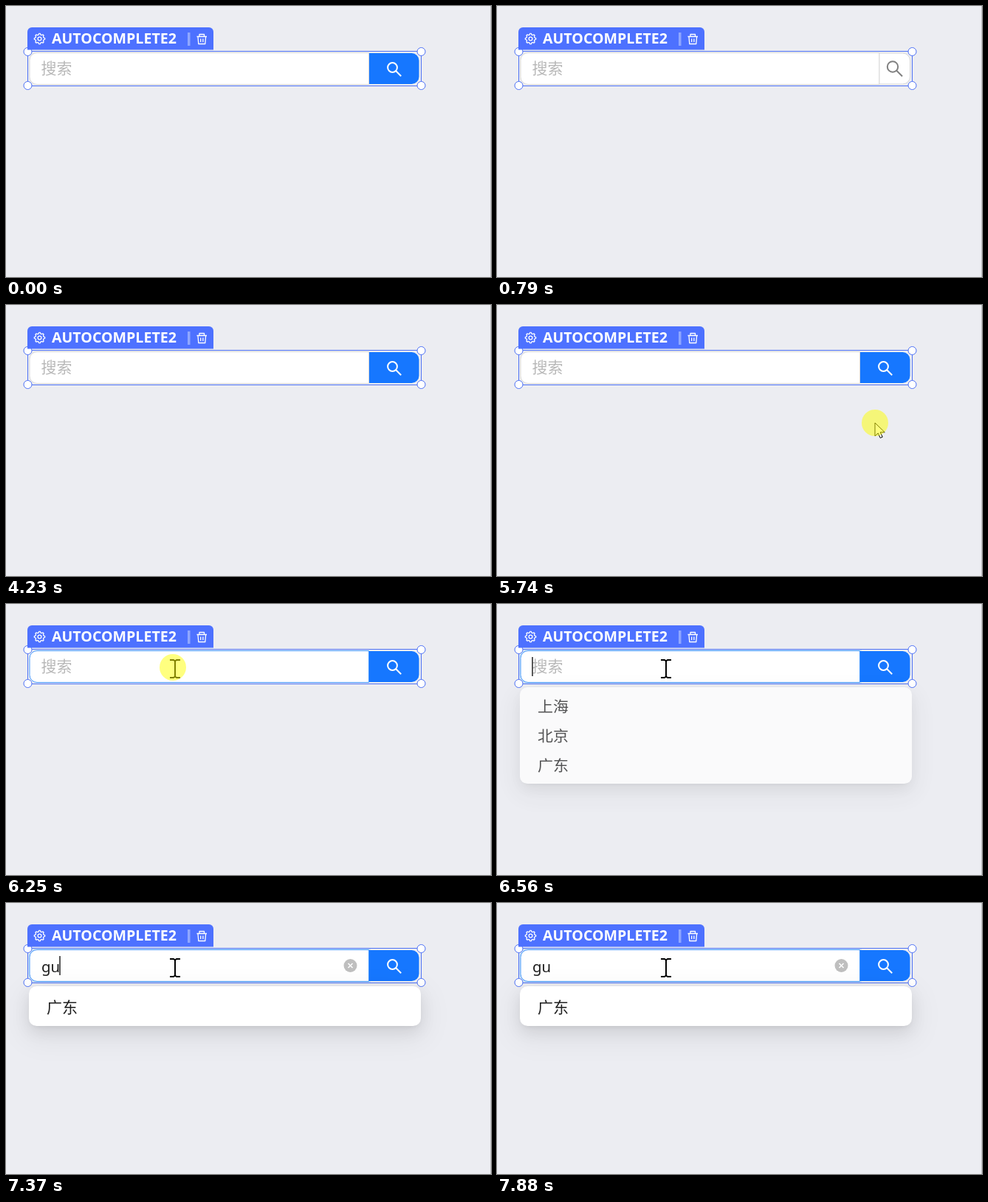
An HTML page that plays this animation: 657x368 px, repeating every 8 s.

```html
<!DOCTYPE html>
<html lang="zh">
<head>
<meta charset="utf-8">
<style>
  html, body { margin: 0; width: 100%; height: 100%; overflow: hidden; background: #ecedf2; }
  svg, #menu { position: absolute; left: 0; top: 0; }
  svg { width: 657px; height: 368px; }
  text, #menu { font: 21px "Noto Sans CJK SC", "Noto Sans CJK", sans-serif; }
  #title { font: 700 19.6px "Open Sans", sans-serif; fill: #fff; }
  #typed { font: 20.4px "Noto Sans", sans-serif; fill: #1f1f1f; }
  #hint { font-weight: 300; fill: #000; fill-opacity: .28; }
  #menu {
    left: 31px; top: 113px; width: 531px; box-sizing: border-box; padding: 6px 24px;
    border-radius: 10.5px; background: #fff; color: #1f1f1f; line-height: 42px;
    transform-origin: 0 0;
    box-shadow: 0 8px 21px rgba(0,0,0,.08), 0 4px 8px -5px rgba(0,0,0,.12), 0 12px 37px 10px rgba(0,0,0,.05);
  }
  #menu div { height: 42px; }
</style>
</head>
<body>
<svg viewBox="0 0 657 368" fill="none">
  <path d="M656.5 0V368" stroke="#c3c4c8"/>
  <path id="glow" stroke="#0591ff" stroke-opacity=".12" stroke-width="5"/>
  <g id="search">
    <path id="field" fill="#fff"/>
    <path id="button"/>
    <path id="lens" stroke-width="2"/>
  </g>
  <rect id="plain" x="31.5" y="63.5" width="530" height="41" rx="9.5"/>
  <text id="hint">搜索</text>
  <text id="typed" x="48" y="94">gu</text>
  <g id="clear">
    <circle cx="466.5" cy="85" r="9" fill="#bfbfbf"/>
    <path d="M463.5 82l6 6m0-6l-6 6" stroke="#fff" stroke-width="1.5"/>
  </g>
  <path id="caret" stroke="#000" stroke-width="1.3"/>
  <g stroke="#4d71f5">
    <rect x="29.5" y="61.5" width="533" height="47"/>
    <g id="handles" fill="#fff"></g>
  </g>
  <path d="M29 59.5V35a6 6 0 0 1 6-6H275a6 6 0 0 1 6 6V59.5z" fill="#4d71ff"/>
  <text id="title" x="62" y="51">AUTOCOMPLETE2</text>
  <rect x="246" y="36" width="3.5" height="18" fill="#8fa7ff"/>
  <g stroke="#fff" stroke-width="1.3" stroke-linejoin="round">
    <path id="gear"/>
    <circle cx="45.5" cy="44.5" r="2.4"/>
    <path d="M258.5 41.5h13.5M262 41v-2.5h6.5V41M260 42l.8 9.5h9L270.600 42M263.700 44.500v4.500M266.900 44.500v4.500"/>
  </g>
</svg>
<div id="menu"></div>
<svg viewBox="0 0 657 368" fill="none">
  <g id="pointer">
    <path id="arrow" d="M0 0V18l4.200-4 3 6.500 3-1.300-3-6.400h6z" fill="#fff" stroke="#000"/>
    <path id="beam" d="M-4-10h5l2 1.500 2-1.500h5M3-9V13M-4 14h5l2-1.500 2 1.500h5" stroke="#000" stroke-width="2"/>
    <circle id="halo" r="18" fill="#ff0" fill-opacity=".5"/>
  </g>
</svg>
<script>
const LOOP = 8000;
const el = Object.fromEntries([...document.querySelectorAll('[id]')].map(e => [e.id, e]));
const set = (e, attrs) => { for (const k in attrs) e.setAttribute(k, attrs[k]); };
const show = (e, on) => { e.style.display = on ? '' : 'none'; };
const mix = (a, b, p) => a + (b - a) * p;
const blend = (a, b, p) => `rgb(${a.map((v, i) => Math.round(mix(v, b[i], p)))})`;

// Each row is [start time, ...values]; a row holds until the next one starts.
const held = (rows, t) => rows.findLast(r => r[0] <= t).slice(1);

const BLUE = [22, 119, 255], WHITE = [255, 255, 255], LINE = [217, 217, 217];
const GREY = [128, 128, 128], HOVER = [64, 150, 255], INK = [28, 28, 34];

const restyle = [[0, 0], [500, .2], [600, .65], [700, .93], [790, 1], [4230, 0]];
const settle = [[0, 0], [2920, .7], [3020, .95], [3120, 1]];
const hover = [[0, 0], [6040, .4], [6140, .9], [6250, 1]];
const opening = [[0, 0], [6460, .25], [6560, .75], [6660, .95], [6760, 1]];
const path = [[0, 552, 167], [5740, 512, 160], [5840, 380, 160], [5940, 273, 140],
  [6040, 235, 103], [6140, 228, 90], [6250, 226, 86]];
const caretSpans = [[6340, 6870, 48], [7370, 7880, 73]];

const fieldPath = x => `M${x} 63.500V106.500H42a10 10 0 0 1-10-10V73.500a10 10 0 0 1 10-10z`;
const buttonPath = x => `M${x} 64H549.500a10 10 0 0 1 10 10V96a10 10 0 0 1-10 10H${x}z`;
const lensPath = (x, y, r, tail) =>
  `M${x - r} ${y}a${r} ${r} 0 1 1 ${2 * r} 0a${r} ${r} 0 1 1 ${-2 * r} 0M${x + r * .7} ${y + r * .7}l${tail} ${tail}`;

el.gear.setAttribute('d', 'M' + Array.from({ length: 32 }, (_, k) => {
  const r = k % 4 < 2 ? 7.2 : 5.6, a = (k - .5) * Math.PI / 16;
  return `${45.5 + r * Math.cos(a)} ${44.5 + r * Math.sin(a)}`;
}).join('L') + 'z');
el.handles.innerHTML = [29.5, 562.5].flatMap(x =>
  [62, 108].map(y => `<circle cx="${x}" cy="${y}" r="5.5"/>`)).join('');

let items = '';
function setItems(names) {
  if (items === names) return;
  items = names;
  el.menu.innerHTML = names.split(' ').map(n => `<div>${n}</div>`).join('');
}

function drawField(t) {
  const isPlain = t >= 2800 && t < 4230;
  const isTyped = t >= 7370;
  const isFocused = t >= 6340;
  const [p] = held(restyle, t), [s] = held(settle, t), [h] = held(hover, t);
  const edge = p ? 518 : 491.5;

  show(el.search, !isPlain);
  show(el.plain, isPlain);
  show(el.glow, isFocused);
  set(el.field, { d: fieldPath(edge), stroke: blend(LINE, HOVER, h) });
  set(el.glow, { d: fieldPath(edge) });
  set(el.button, {
    d: buttonPath(p ? 518 : 492), fill: blend(BLUE, WHITE, p),
    stroke: p ? blend(BLUE, LINE, p) : 'none'
  });
  set(el.lens, {
    d: p ? lensPath(536, 82.5, 7.2, 8) : lensPath(523.5, 83.5, 6.4, 7.2),
    stroke: blend(WHITE, GREY, p)
  });
  set(el.plain, { fill: '#fff', 'fill-opacity': mix(.1, 1, s), stroke: blend(INK, LINE, s) });
  set(el.hint, { x: isPlain ? mix(33, 47.5, s) : 47.5, y: isPlain ? 93 : 92 });
  show(el.hint, !isTyped);
  show(el.typed, isTyped);
  show(el.clear, isTyped);

  const span = caretSpans.find(([from, to]) => t >= from && t < to);
  show(el.caret, span);
  if (span) set(el.caret, { d: `M${span[2]} 72V98` });
}

function drawMenu(t) {
  const [p] = held(opening, t);
  setItems(t < 7370 ? '上海 北京 广东' : '广东');
  show(el.menu, p > 0);
  el.menu.style.opacity = p;
  el.menu.style.transform = `scaleY(${mix(.8, 1, p)})`;
}

function drawPointer(t) {
  const [x, y] = held(path, t);
  const isInside = t >= 6040;
  show(el.pointer, t >= 5640);
  set(el.pointer, { transform: `translate(${x} ${y})` });
  show(el.arrow, !isInside);
  show(el.beam, isInside);
  show(el.halo, t < 6340);
}

const start = performance.now();
function draw() {
  const t = (performance.now() - start) % LOOP;
  drawField(t);
  drawMenu(t);
  drawPointer(t);
  requestAnimationFrame(draw);
}
draw();
</script>
</body>
</html>
```
